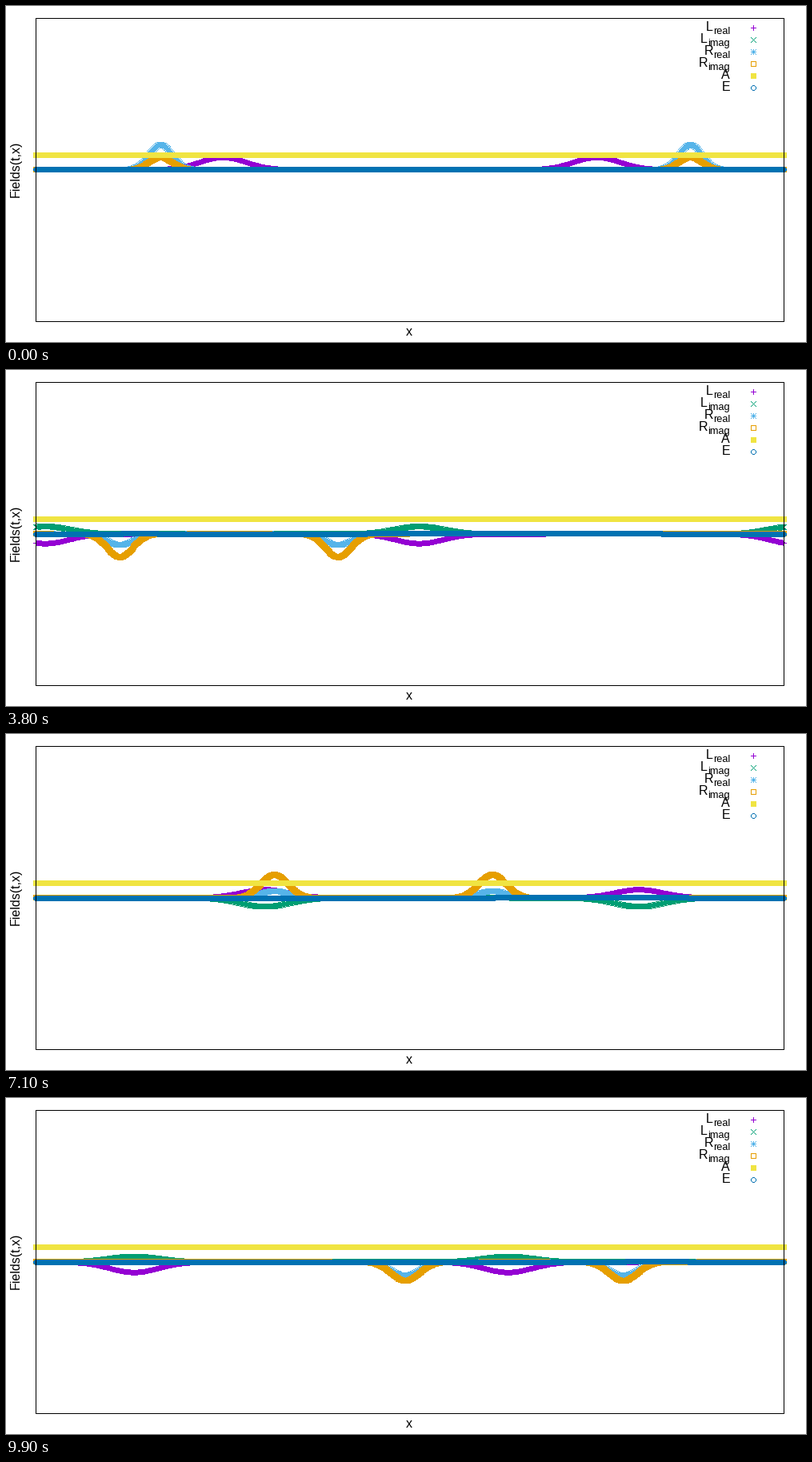
Recreate the animation shown at these times as a matplotlib script. Size 1000 by 420 pixels, loop 10 s.

```python
import math

import numpy as np
import matplotlib.pyplot as plt
from matplotlib.animation import FuncAnimation

W, H, DPI = 1000, 420, 100
FRAMES, INTERVAL = 100, 100
LEFT, RIGHT, TOP, BOTTOM = 37, 972, 15, 394
SPAN = RIGHT - LEFT
SPEED = SPAN / 160          # pixels per frame
TURN = 0.1                  # phase, radians per frame
UNIT = 15.6                 # pixels per unit of field
SPREAD = 0.95               # growth of the variance per frame
SIGMA_L, SIGMA_R = 29.2, 14.6
START_L = (LEFT + SPAN / 4, LEFT + SPAN * 3 / 4)
START_R = (LEFT + SPAN / 6, LEFT + SPAN * 7 / 8)

PURPLE, GREEN, SKY = (148, 0, 211), (0, 158, 115), (86, 180, 233)
ORANGE, YELLOW, BLUE = (230, 159, 0), (240, 228, 66), (0, 114, 178)

# 7 x 7 marker stamps as boolean masks
dy, dx = np.mgrid[-3:4, -3:4]
PLUS = (dx == 0) | (dy == 0)
CROSS = abs(dx) == abs(dy)
STAR = PLUS | CROSS
BOX = np.maximum(abs(dx), abs(dy)) == 3
BLOCK = np.ones((7, 7), bool)
RING = abs(np.hypot(dx, dy) - 2.9) < 0.5

STYLES = [(PLUS, PURPLE), (CROSS, GREEN), (STAR, SKY),
          (BOX, ORANGE), (BLOCK, YELLOW), (RING, BLUE)]
LABELS = [("L", "real"), ("L", "imag"), ("R", "real"),
          ("R", "imag"), ("A", ""), ("E", "")]

xs = np.linspace(LEFT, RIGHT, 1001)
cols = np.rint(xs).astype(int)
erf = np.vectorize(math.erf)


def stamp(img, x, y, style):
    mask, color = style
    for oy, ox in np.argwhere(mask) - 3:
        img[y + oy, x + ox] = color


def to_row(value):
    return np.floor(205 - value - 1e-5).astype(int)


def pulses(starts, shift, sigma, frame):
    """Travelling periodic bumps that slowly widen."""
    var = sigma ** 2 + SPREAD * frame
    total = np.zeros_like(xs)
    for x0 in starts:
        d = (xs - x0 - shift + SPAN / 2) % SPAN - SPAN / 2
        total += np.exp(-d ** 2 / (2 * var))
    return UNIT * sigma / math.sqrt(var) * total


def passed(starts, shift, sigma, frame):
    """Charge that has crossed each point."""
    now = math.sqrt(sigma ** 2 + SPREAD * frame)
    total = np.zeros_like(xs)
    for x0 in starts:
        for turn in (-SPAN, 0, SPAN):
            d = xs - x0 - turn
            total += (erf(d / sigma) - erf((d - shift) / now)) / 2
    return total


def fields(frame):
    shift = SPEED * frame
    left = pulses(START_L, -shift, SIGMA_L, frame) * np.exp(-1j * TURN * frame)
    right = (pulses(START_R, shift, SIGMA_R, frame)
             * (2 + 1j) * np.exp(1j * TURN * frame))
    charge = (-0.05 * passed(START_R, shift, SIGMA_R, frame)
              - 0.02 * passed(START_L, -shift, SIGMA_L, frame))
    potential = np.full_like(xs, 18.0)
    if frame:
        # L carries the opposite current, so its passage raises E
        electric = charge
    else:
        electric = np.zeros_like(xs)
    return left.real, left.imag, right.real, right.imag, potential, electric


def render(frame):
    img = np.full((H, W, 3), 255, np.uint8)
    for values, style in zip(fields(frame), STYLES):
        stamp(img, cols, to_row(values), style)
    for i, style in enumerate(STYLES):
        stamp(img, 934, 27 + 15 * i, style)
    img[[TOP, BOTTOM], LEFT:RIGHT + 1] = 0
    img[TOP:BOTTOM + 1, [LEFT, RIGHT]] = 0
    return img


fig = plt.figure(figsize=(W / DPI, H / DPI), dpi=DPI, facecolor="white")
ax = fig.add_axes([0, 0, 1, 1])
ax.axis("off")
picture = ax.imshow(render(0), extent=(0, W, H, 0), aspect="auto",
                    interpolation="nearest")
ax.set_xlim(0, W)
ax.set_ylim(H, 0)


def label(x, y, text, px=16, **kw):
    ax.text(x, y, text, fontsize=px * 72 / DPI, family="Liberation Sans",
            va="baseline", **kw)


SUB_START = {"real": 884, "imag": 877, "": 905}
for i, (name, sub) in enumerate(LABELS):
    base = 31 + 15 * i
    label(SUB_START[sub], base, name, ha="right")
    if sub:
        label(905, base + 4, sub, px=12.8, ha="right")
label(504, 412, "x", ha="center")
label(17, 204, "Fields(t,x)", ha="center", rotation=90,
      rotation_mode="anchor")


def update(frame):
    picture.set_data(render(frame))
    return (picture,)


anim = FuncAnimation(fig, update, frames=FRAMES, interval=INTERVAL,
                     repeat=True, repeat_delay=0, blit=False)
plt.show()
```
